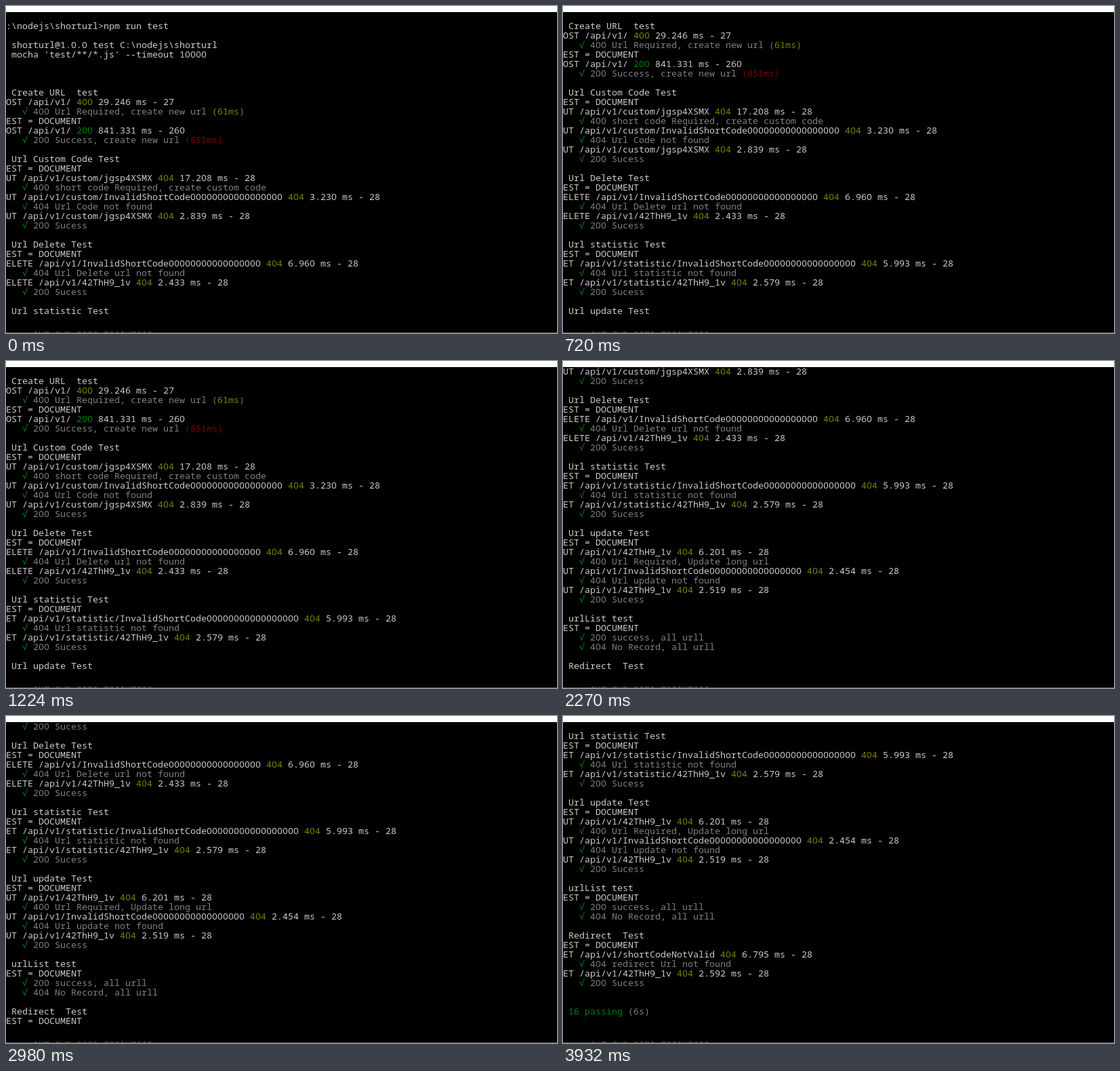
An HTML page for the animation above (4.48 s loop, 813x482 px).

```html
<!DOCTYPE html>
<html lang="en">
<head>
<meta charset="utf-8">
<title>Test run</title>
<style>
  html, body { margin: 0; width: 100%; height: 100%; overflow: hidden; background: #fff; }
  svg { display: block; }
  text { font: 13.3333px "Noto Sans Mono", "DejaVu Sans Mono", monospace; fill: #ccc; }
  .zero { font-family: "Liberation Sans", sans-serif; }
  .gray { fill: #808080; }
  .green { fill: #008000; }
  .yellow { fill: #808000; }
  .red { fill: #800000; }
  .dim { fill: #6b6262; }
</style>
</head>
<body>
<svg width="813" height="482" viewBox="0 0 813 482">
  <rect y="9" width="813" height="473"/>
  <svg y="9" width="813" height="448" overflow="hidden"><g id="log"></g></svg>
  <g id="edge"></g>
  <rect y="481" width="813" height="1" fill="#584a4a"/>
</svg>
<script>
const CELL = 8, ROW = 14, LOOP = 4480;
const NS = "http://www.w3.org/2000/svg";
const log = document.getElementById("log");

// A line is a list of [text, tone] runs on the character grid.
const plain = text => [[text, ""]];
const head = text => plain(" " + text);
const doc = plain("EST = DOCUMENT");
const gap = [];
const call = (path, code, rest) => [
  [path + " ", ""], [code, code === "200" ? "green" : "yellow"], [" " + rest, ""]
];
const pass = (text, time = "", tone = "") => [
  ["   √ ", "green"], [text + " ", "gray"], [time, tone]
];
const bad = "InvalidShortCode" + "0".repeat(17);
const custom = "UT /api/v1/custom/";
const stat = "ET /api/v1/statistic/";
const done = pass("200 Sucess");

const lines = [
  gap,
  plain(":\\nodejs\\shorturl>npm run test"),
  gap,
  head("shorturl@1.0.0 test C:\\nodejs\\shorturl"),
  head("mocha 'test/**/*.js' --timeout 10000"),
  gap, gap, gap,
  head("Create URL  test"),
  call("OST /api/v1/", "400", "29.246 ms - 27"),
  pass("400 Url Required, create new url", "(61ms)", "yellow"),
  doc,
  call("OST /api/v1/", "200", "841.331 ms - 260"),
  pass("200 Success, create new url", "(851ms)", "red"),
  gap,
  head("Url Custom Code Test"),
  doc,
  call(custom + "jgsp4XSMX", "404", "17.208 ms - 28"),
  pass("400 short code Required, create custom code"),
  call(custom + bad, "404", "3.230 ms - 28"),
  pass("404 Url Code not found"),
  call(custom + "jgsp4XSMX", "404", "2.839 ms - 28"),
  done,
  gap,
  head("Url Delete Test"),
  doc,
  call("ELETE /api/v1/" + bad, "404", "6.960 ms - 28"),
  pass("404 Url Delete url not found"),
  call("ELETE /api/v1/42ThH9_1v", "404", "2.433 ms - 28"),
  done,
  gap,
  head("Url statistic Test"),
  doc,
  call(stat + bad, "404", "5.993 ms - 28"),
  pass("404 Url statistic not found"),
  call(stat + "42ThH9_1v", "404", "2.579 ms - 28"),
  done,
  gap,
  head("Url update Test"),
  doc,
  call("UT /api/v1/42ThH9_1v", "404", "6.201 ms - 28"),
  pass("400 Url Required, Update long url"),
  call("UT /api/v1/" + bad, "404", "2.454 ms - 28"),
  pass("404 Url update not found"),
  call("UT /api/v1/42ThH9_1v", "404", "2.519 ms - 28"),
  done,
  gap,
  head("urlList test"),
  doc,
  pass("200 success, all urll"),
  pass("404 No Record, all urll"),
  gap,
  head("Redirect  Test"),
  doc,
  call("ET /api/v1/shortCodeNotValid", "404", "6.795 ms - 28"),
  pass("404 redirect Url not found"),
  call("ET /api/v1/42ThH9_1v", "404", "2.592 ms - 28"),
  done,
  gap, gap,
  [[" 16 passing ", "green"], ["(6s)", "gray"]]
];

function make(name, attrs, parent) {
  const node = document.createElementNS(NS, name);
  for (const key in attrs) node.setAttribute(key, attrs[key]);
  return parent.appendChild(node);
}

function write(parent, runs, y) {
  const line = make("text", { y }, parent);
  let col = 0;
  for (const [text, tone] of runs) {
    // Zeros are set apart so that they carry no slash.
    for (const m of text.matchAll(/0|[^\s0]+/g)) {
      const zero = m[0] === "0";
      const x = (col + m.index) * CELL + (zero ? 0.3 : 0);
      make("tspan", { x, class: tone + (zero ? " zero" : "") }, line).textContent = m[0];
    }
    col += text.length;
  }
}

lines.forEach((runs, i) => write(log, runs, i * ROW + 11));
write(document.getElementById("edge"), [["     our own name resources", "dim"]], 487);

// [start in ms, rows scrolled]
const steps = [[0, 0], [720, 7], [1560, 16], [2270, 21], [2980, 22], [3110, 30], [LOOP, 30]];
log.animate(
  steps.map(([t, rows]) => ({
    offset: t / LOOP,
    transform: `translateY(${-rows * ROW}px)`,
    easing: "steps(1, end)"
  })),
  { duration: LOOP, iterations: Infinity }
);
</script>
</body>
</html>
```
